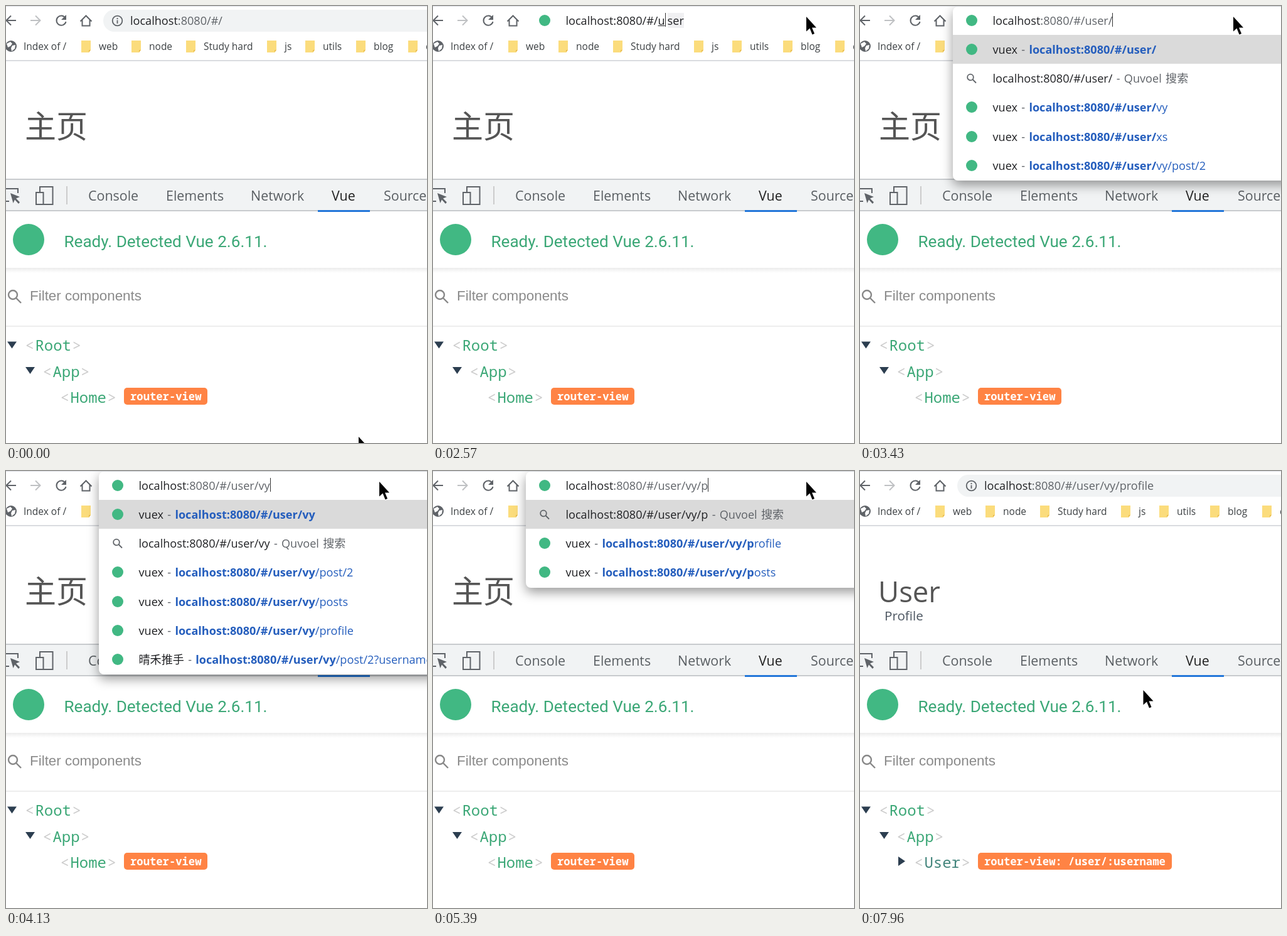
These frames come from a looping animation (671 px wide and 696 px high, 8000 ms). An HTML page:

```html
<!DOCTYPE html>
<html lang="zh">
<head>
<meta charset="utf-8">
<style>
html, body { margin: 0; width: 100%; height: 100%; overflow: hidden; background: #fff; }
body { position: relative; font-family: "Open Sans", "Noto Sans CJK SC", sans-serif; }
div, svg { position: absolute; }
#stage { left: 0; top: 0; width: 100%; height: 100%; overflow: hidden; }
#icons { left: 0; top: 0; }
.t { line-height: 0; white-space: pre; }
.light { font-weight: 300; }
.mono { font-family: "Noto Sans Mono", monospace; }
.roboto { font-family: Roboto, sans-serif; }
.arial { font-family: "Liberation Sans", Arial, sans-serif; }
.tag { color: #ccc; }
.tag span { color: #3ba776; margin: 0 1.5px; }
.tag .user { color: #43857c; }
.badge { left: 188px; top: 608px; height: 27px; line-height: 27px; padding: 0 10px; border-radius: 5px;
  background: #ff8344; color: #fff; font-size: 17.2px; font-weight: 600; white-space: pre; }
.pill { left: 155px; top: 6px; width: 600px; height: 35px; border-radius: 18px; background: #f1f3f4; }
.pill.focus { background: #fff; box-shadow: 0 0 0 2px #b0cbf7; }
.popup { left: 148px; top: 1px; width: 700px; background: #fff; border-radius: 8px; box-shadow: 0 7px 18px #0006; }
.first { left: 148px; top: 46px; width: 700px; height: 46px; background: #dadada; }
.logo { border-radius: 50%; background: #41b883; }
.url { word-spacing: 1.6px; color: #202124; }
.url s { text-decoration: none; color: #5f6368; }
.url a { color: #255ebd; }
.sel { background: #accef7; }
.hint { background: #f0f0f2; margin-left: 4px; }
.url i { position: absolute; top: -12px; width: 1px; height: 22px; background: #333; }
</style>
</head>
<body>
<div id="stage">
<div id="base"></div>
<svg id="icons" width="671" height="696" fill="none" stroke="#5f6368" stroke-width="2">
  <path d="M16 23H1M8 15.5L.5 23 8 30.5"/>
  <path stroke="#bfc1c3" d="M39 23H54M47 15.5L54.5 23 47 30.5"/>
  <path d="M94.5 19A7.6 7.6 0 1 0 95.5 25"/>
  <path fill="#5f6368" stroke="none" d="M96 14V22H88Z"/>
  <path d="M118.5 24.5L127.5 15.5 136.5 24.5M121.5 22V31.5H133.5V22"/>
  <circle cx="8" cy="64" r="9" fill="#5f6368" stroke="none"/>
  <path fill="#fff" stroke="none" d="M1 60L7 57 10 60 7 64 3 66ZM10 63L15 62 14 68 9 72 8 67Z"/>
  <g id="folders" stroke="none"></g>
  <path d="M-1 291H19V298M-1 311H5"/>
  <path fill="#5f6368" stroke="none" d="M7 298L22 304 16 306.5 22 312.5 20 315 14 308.5 11.5 314Z"/>
  <path d="M54 296V288H74.5V316H60M48 297H59.5V316H48Z"/>
  <path stroke="#ccc" d="M97 287V316"/>
  <path stroke="#888" stroke-width="2.4" d="M16.5 465.5L24 473"/>
  <circle stroke="#888" stroke-width="2.4" cx="11" cy="460" r="7"/>
  <path fill="#2c3e50" stroke="none" d="M2 534.5H17L9.5 545.5ZM31 575H46L38.5 586Z"/>
</svg>
<div id="page"></div>
<div id="bar"></div>
<svg id="cursor" width="24" height="32" overflow="visible" style="left:0;top:0">
  <path id="arrow" stroke="#fff" stroke-width="2" paint-order="stroke" d="M0 0V23.500L5.500 18.500 9.500 28.500 13 27 9 17.500H16Z"/>
  <path id="beam" fill="none" stroke="#111" stroke-width="2" d="M-4-12H-1.500L0-10.500 1.500-12H4M0-11V11M-4 12H-1.500L0 10.500 1.500 12H4"/>
</svg>
</div>
<script>
const $ = id => document.getElementById(id);
const text = (x, y, size, html, color = '#3c4043', cls = '') =>
  `<div class="t ${cls}" style="left:${x}px;top:${y}px;font-size:${size}px;color:${color}">${html}</div>`;
const box = (x, y, w, h, color, cls = '') =>
  `<div class="${cls}" style="left:${x}px;top:${y}px;width:${w}px;height:${h}px;background:${color}"></div>`;
const tag = (x, y, name, cls = '') =>
  text(x, y, 24, `&lt;<span class="${cls}">${name}</span>&gt;`, '', 'mono tag');
const dot = (x, y, r) => box(x - r, y - r, 2 * r, 2 * r, '#41b883', 'logo');

const bookmarks = [[148, 'web'], [228, 'node'], [315, 'Study hard'], [444, 'js'], [505, 'utils'], [586, 'blog'], [669, 'css']];
const tabs = [[131, 'Console'], [255, 'Elements'], [390, 'Network'], [519, 'Vue'], [602, 'Sources']];

$('folders').innerHTML = bookmarks.map(([x]) =>
  `<path fill="#fbdc7c" d="M${x - 28} 55h15v15l-3 4h-12z"/><path fill="#e9bd4e" d="M${x - 16} 74v-4h3z"/>`).join('');

$('base').innerHTML =
  box(0, 0, 671, 1, '#dee1e6') + box(0, 86, 671, 2, '#dadce0') +
  text(28, 64, 15.5, 'Index of /') + bookmarks.map(([x, s]) => text(x, 64, 15.5, s)).join('') +
  box(0, 275, 671, 52, '#c8cbce') + box(0, 277, 671, 48, '#f1f3f4') +
  tabs.map(([x, s]) => text(x, 302, 21.4, s, s == 'Vue' ? '#222' : '#5a5f63')).join('') +
  box(497, 325, 83, 3, '#2377d9') +
  dot(36, 371.5, 25) + text(92.5, 375, 26.1, 'Ready. Detected Vue 2.6.11.', '#3ba776', 'roboto') +
  box(0, 417, 671, 8, 'linear-gradient(#ececec, #fff)') +
  text(38, 462, 22.4, 'Filter components', '#8a8a8a', 'arial') + box(0, 509, 671, 2, '#eee') +
  tag(30.5, 540, 'Root') + tag(58.5, 582, 'App');

const badge = s => `<div class="badge mono">${s}</div>`;
const homePage = text(30, 190.5, 50, '主页', '#555', 'light') + tag(86.5, 623, 'Home') + badge('router-view');
const userPage = text(29, 191, 45.5, 'User', '#555') + text(39, 230, 20.6, 'Profile', '#4c5661') +
  `<svg style="left:61px;top:614px" width="12" height="16" fill="#2c3e50"><path d="M0 0L11 7.500 0 15Z"/></svg>` +
  tag(86.5, 623, 'User', 'user') + badge('router-view: /user/:username');

const HOST = 'localhost', ROOT = ':8080/#/', SIZE = 18.1;
const paths = ['user/', 'user/vy', 'user/xs', 'user/vy/post/2', 'user/vy/profile', 'user/vy/posts', 'user/vy/post/2?username=vy'];

// time, typed text, inline completion, popup rows (index into paths, s = search)
const typing = [
  [2570, 'u', 'ser', ''], [2660, 'u', 'ser', '0s1234'], [2810, 'us', 'er', '0s1234'],
  [2960, 'use', 'r', '0s12345'], [3360, 'user', '/', '0s12345'], [3430, 'user/', '', '0s123'],
  [3980, 'user/v', 'y', '1s354'], [4130, 'user/vy', '', '1s3546'], [4300, 'user/vy/', '', '1s354'],
  [4680, 'user/vy/p', 'ost/2', '3s456'], [4760, 'user/vy/po', 'st/2', '3s'], [4910, 'user/vy/po', '', 's3'],
  [5390, 'user/vy/p', '', 's45'], [5860, 'user/vy/pro', 'file', '4s'], [6090, 'user/vy/prof', 'ile', '4s'],
  [6160, 'user/vy/profi', 'le', '4s'], [6410, 'user/vy/profil', 'e', '4s'], [6480, 'user/vy/profile', '', '4s']];

const url = (x, y, html) => text(x, y, SIZE, html, '', 'url');
const plain = path => url(198, 23, `${HOST}<s>${ROOT}${path}</s>`);
const pill = (cls, content) => `<div class="pill ${cls}"></div>
  <svg style="left:168px;top:14px" width="20" height="20" fill="none" stroke="#5f6368" stroke-width="1.800">
  <circle cx="9.500" cy="9.500" r="7.800"/><path d="M9.500 8.500V14M9.500 5V7"/></svg>` + content;

function row(key, y, typed) {
  if (key == 's') return `<svg style="left:169px;top:${y - 8}px" width="18" height="18" fill="none" stroke="#5f6368" stroke-width="1.800">
    <circle cx="7" cy="6.500" r="4.800"/><path d="M10.500 10L16 15.500"/></svg>` +
    url(211.5, y, `${HOST}${ROOT}${typed}<s> - Quvoel 搜索</s>`);
  const title = key == 6 ? '晴禾推手' : 'vuex';
  return dot(178, y, 9) + url(211.5, y, `${title}<s> - </s><a><b>${HOST}${ROOT}${typed}</b>${paths[key].slice(typed.length)}</a>`);
}

function addressBar(t) {
  if (t < 700) return pill('', plain(''));
  if (t < 1020) return pill('focus', url(198, 23, `<span class="sel">${HOST}${ROOT}</span>`));
  if (t < 2570) return pill('focus', url(198, 23, HOST + ROOT + (t < 1550 || t >= 2100 ? '<i></i>' : '')));
  if (t >= 6720) return pill('', plain(paths[4]));
  const [, typed, rest, rows] = typing.findLast(s => s[0] <= t);
  if (!rows) return dot(178, 23, 9) + url(211.5, 23, `${HOST}${ROOT}<u>${typed}</u><i></i><span class="hint">${rest}</span>`);
  return `<div class="popup" style="height:${46 + 46.2 * rows.length}px"></div><div class="first"></div>` + dot(178, 23, 9) +
    url(211.5, 23, `${HOST}<s>${ROOT}${typed}</s>` + (rest ? `<span class="sel">${rest}</span>` : '<i></i>')) +
    [...rows].map((key, n) => row(key, 69 + 46.2 * n, typed)).join('');
}

// time, x, y of the pointer
const track = [[0, 562, 686], [40, 562, 686], [600, 454, 32], [840, 454, 26], [920, 470, 20], [1240, 595, 17],
  [7800, 595, 17], [7880, 328, 340], [7960, 451.5, 349], [8000, 451.5, 349]];

function pointer(t) {
  const time = Math.max(0, Math.floor((t + 40) / 80) * 80 - 40);
  const n = track.findIndex(p => p[0] > time);
  const [t0, x0, y0] = track[n - 1], [t1, x1, y1] = track[n];
  const k = (time - t0) / (t1 - t0);
  return [x0 + (x1 - x0) * k, y0 + (y1 - y0) * k];
}

const shown = {};
function show(id, html) {
  if (shown[id] !== html) $(id).innerHTML = shown[id] = html;
}

function draw() {
  const t = performance.now() % 8000;
  show('page', t < 6800 ? homePage : userPage);
  show('bar', addressBar(t));
  const [x, y] = pointer(t);
  const isBeam = y < 42 && (t < 2570 || t >= 6720);
  $('beam').style.display = isBeam ? '' : 'none';
  $('arrow').style.display = isBeam ? 'none' : '';
  $('cursor').style.transform = `translate(${x}px, ${y}px)`;
  requestAnimationFrame(draw);
}
draw();
</script>
</body>
</html>
```
